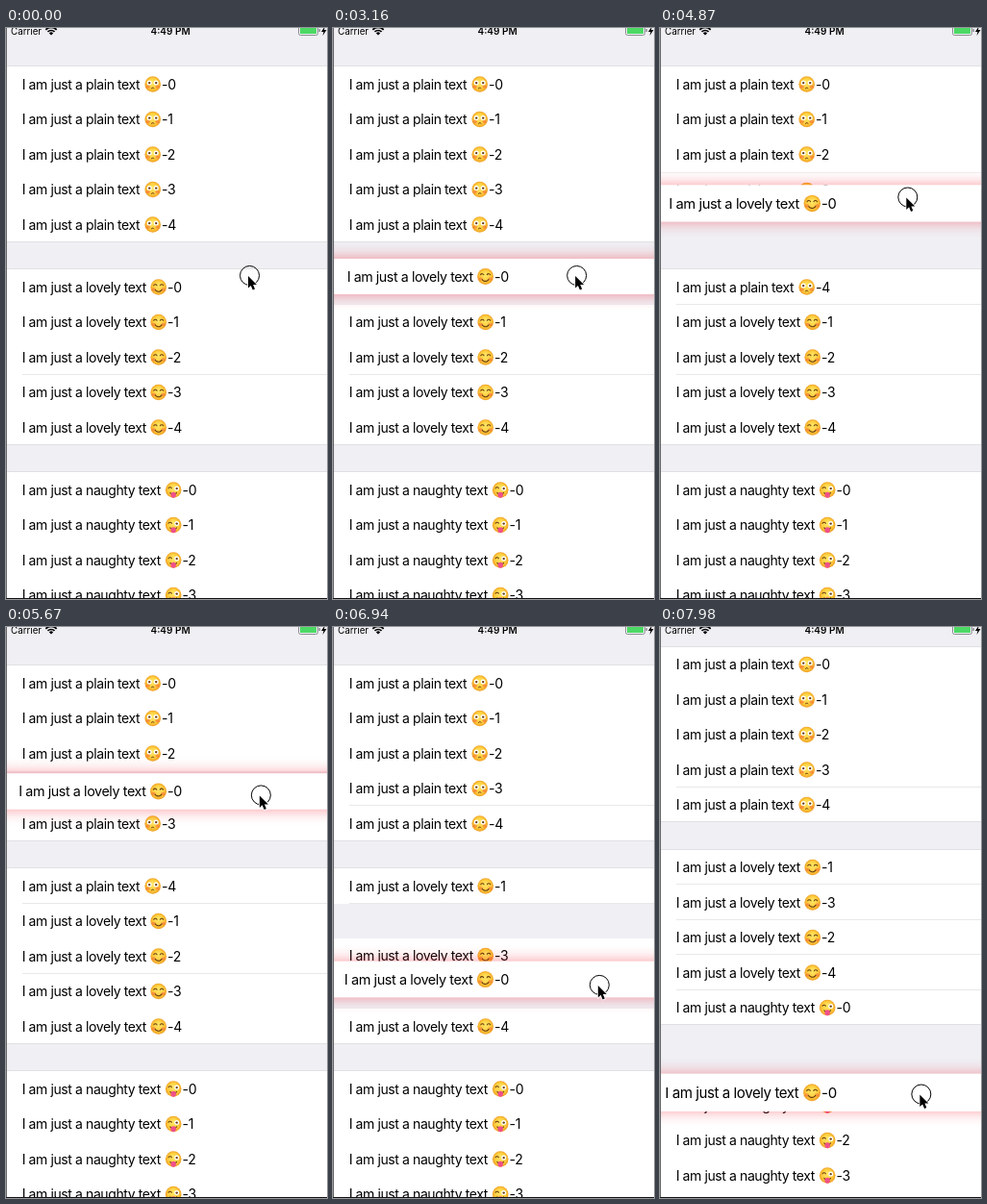
Recreate the animation shown at these times as an HTML page with a canvas. Size 334 by 594 pixels, loop 8000 ms.

```html
<!DOCTYPE html>
<html lang="en">
<head>
<meta charset="utf-8">
<title>Reorderable list</title>
<style>
html, body { margin: 0; width: 100%; height: 100%; overflow: hidden; background: #efeff4; }
canvas { display: block; }
</style>
</head>
<body>
<canvas id="stage" width="334" height="594"></canvas>
<script>
const W = 334, H = 594, LOOP = 8000;
const TOP = 40.25, ROW = 36.5, GAP = 28.5, PER = 5;
const LIFT = 1550, LAG = 65, MOVE = 300, SCROLL = 7680;
const FONT = 'Inter, Roboto, "Liberation Sans", sans-serif';
const BROWN = '#6b3d10';
const c = document.getElementById('stage').getContext('2d');

const clamp = v => Math.max(0, Math.min(1, v));
const ease = p => (1 - Math.cos(Math.PI * clamp(p))) / 2;
const slotY = s => TOP + s * ROW + Math.floor(s / PER) * GAP;

// The pointer's height moves evenly between [time, y] turning points; it sways sideways on a bell curve.
const turns = [[3190, 257.5], [4050, 245.5], [4870, 176], [5100, 170], [5650, 170],
  [6190, 296], [6920, 370], [7940, 486]];
const pointerY = t => turns.slice(1).reduce((y, [end, to], i) => {
  const [begin, from] = turns[i];
  return y + (to - from) * clamp((t - begin) / (end - begin));
}, turns[0][1]);
const pointerX = t => 253.5 + 24 * Math.exp(-(((t - 7100) / 1700) ** 2));

const kinds = [
  { word: 'plain', face: 152.7 },
  { word: 'lovely', face: 158.7 },
  { word: 'naughty', face: 174.2 }
];
const rows = Array.from({ length: 3 * PER }, (_, slot) =>
  ({ kind: Math.floor(slot / PER), n: slot % PER, slot, moves: [] }));
const lifted = rows[PER];

// The lifted row trades places with each slot it visits: [time, slot]
const slots = rows.slice();
[[4480, 4], [4840, 3], [5750, 4], [5890, 5], [6230, 6], [6790, 8], [7280, 9], [SCROLL, 10]]
  .forEach(([at, to]) => {
    const from = slots.indexOf(lifted);
    slots[to].moves.push({ at, dy: slotY(from) - slotY(to) });
    [slots[from], slots[to]] = [slots[to], slots[from]];
  });

function rect(color, x, y, w, h) {
  c.fillStyle = color;
  c.fillRect(x, y, w, h);
}
function disc(color, x, y, rx, ry = rx) {
  c.fillStyle = color;
  c.beginPath();
  c.ellipse(x, y, rx, ry, 0, 0, 7);
  c.fill();
}
function arc(color, width, x, y, r, from, to) {
  c.strokeStyle = color;
  c.lineWidth = width;
  c.beginPath();
  c.arc(x, y, r, from * Math.PI, to * Math.PI);
  c.stroke();
}
function text(str, x, y, size, weight = 400, spacing = 0) {
  c.font = `${weight} ${size}px ${FONT}`;
  c.letterSpacing = spacing + 'px';
  c.fillStyle = '#000';
  c.fillText(str, x, y);
}

function openEye(x) {
  disc('#fff', x, -1.4, 2.5);
  disc(BROWN, x, -1.4, 1.2);
}
const closedEye = x => arc(BROWN, 1.1, x, -1, 1.8, 1.05, 1.95);
const smile = () => arc(BROWN, 1.1, 0, .8, 4, .15, .85);
function cheeks() {
  for (const x of [-5, 5]) disc('rgba(246,95,60,.5)', x, 2.5, 2.2, 1.7);
}
const faces = [
  () => {
    cheeks();
    openEye(-3.5);
    openEye(3.5);
    arc(BROWN, 1, 0, 5.5, 1.8, 1.15, 1.85);
  },
  () => {
    cheeks();
    closedEye(-3.3);
    closedEye(3.3);
    smile();
  },
  () => {
    closedEye(-3.5);
    openEye(3.5);
    smile();
    disc('#f0508a', 0, 5.2, 2.7, 3);
  }
];
function emoji(kind, x, y) {
  c.save();
  c.translate(x, y);
  const glow = c.createRadialGradient(0, -2, 1, 0, 0, 8.4);
  glow.addColorStop(0, '#ffe562');
  glow.addColorStop(.65, '#fdcb3c');
  glow.addColorStop(1, '#ee9c22');
  disc(glow, 0, 0, 8.3);
  faces[kind]();
  c.restore();
}

function label({ kind, n }, y) {
  const { word, face } = kinds[kind];
  text(`I am just a ${word} text`, 16.7, y + 5, 14, 400, -.4);
  emoji(kind, face, y);
  text('-' + n, face + 9.3, y + 5, 14, 400, -.3);
}

function drawRow(row, t, scroll) {
  const y = row.moves.reduce((sum, m) => sum + m.dy * ease((t - m.at) / MOVE), slotY(row.slot));
  const top = Math.round(y - scroll), bottom = Math.round(y + ROW - scroll);
  const at = s => Math.abs(slotY(s) - y) < 1;
  const first = [0, 5, 10].some(at), last = [4, 9, 14].some(at);
  const ruled = row.n === 2 && row.kind === 1 || row.moves.some(m => t > m.at);
  rect('#fff', 0, top, W, bottom - top);
  if (first) rect('#e0e0e4', 0, top - 1, W, 1);
  if (last) rect('#e0e0e4', 0, bottom - 1, W, 1);
  else if (ruled) rect('#e8e8ea', 17, bottom - 1, W, 1);
  label(row, y + ROW / 2 - scroll);
}

function drawLifted(t) {
  const up = ease((t - LIFT) / 250);
  const rest = slotY(PER) + ROW / 2;
  const y = rest + (pointerY(t - LAG) + 1 - rest) * up;
  const scale = 1.05 - .05 * Math.cos((t - 1437) / 980 * Math.PI);
  c.save();
  c.shadowColor = `rgba(240,20,40,${.48 * up})`;
  c.shadowBlur = 16;
  rect('#fff', -30, y - ROW / 2, W + 60, ROW);
  c.restore();
  c.save();
  c.translate(W / 2, y);
  c.scale(scale, scale);
  c.translate(-W / 2, 0);
  rect('#fff', 0, -ROW / 2, W, ROW);
  label(lifted, 0);
  c.restore();
}

function statusBar() {
  text('Carrier', 5, 7, 9.8);
  text('4:49 PM', 150.5, 7, 10, 600);
  for (const r of [1.5, 5, 8]) arc('#000', r < 2 ? 3 : 1.7, 47, 7.5, r, 1.25, 1.75);
  c.strokeStyle = '#8e8e93';
  c.lineWidth = 1;
  c.beginPath();
  c.roundRect(304.5, -2.5, 20, 10, 2);
  c.stroke();
  rect('#4cd964', 306, -1, 17, 7);
  rect('#8e8e93', 325.5, 1, 1.5, 3);
  c.fillStyle = '#000';
  c.fill(new Path2D('M332-2l-4 6h2.5l-1 4 4-6h-2.5z'));
}

const arrow = new Path2D('M0 0v12.5l2.8-2.6 2 4.6 2.2-.9-1.9-4.5H9z');
function cursor(t) {
  const x = pointerX(t), y = pointerY(t);
  if (t < 20 || t >= 500) arc('#000', 1, x, y, 10, 0, 2);
  c.save();
  c.translate(x - 1.5, y + .5);
  c.lineWidth = 1.6;
  c.strokeStyle = '#fff';
  c.stroke(arrow);
  c.fillStyle = '#000';
  c.fill(arrow);
  c.restore();
}

function draw(t) {
  const scroll = 19.5 * ease((t - SCROLL) / MOVE);
  rect('#efeff4', 0, 0, W, H);
  rows.forEach(row => {
    if (row !== lifted || t < LIFT) drawRow(row, t, scroll);
  });
  if (t >= LIFT) drawLifted(t);
  statusBar();
  rect('#6a6a6c', 0, 0, 1, H);
  rect('#111', 0, H - 1, W, 1);
  cursor(t);
}

const start = performance.now();
function frame() {
  draw((performance.now() - start) % LOOP);
  requestAnimationFrame(frame);
}
frame();
</script>
</body>
</html>
```
